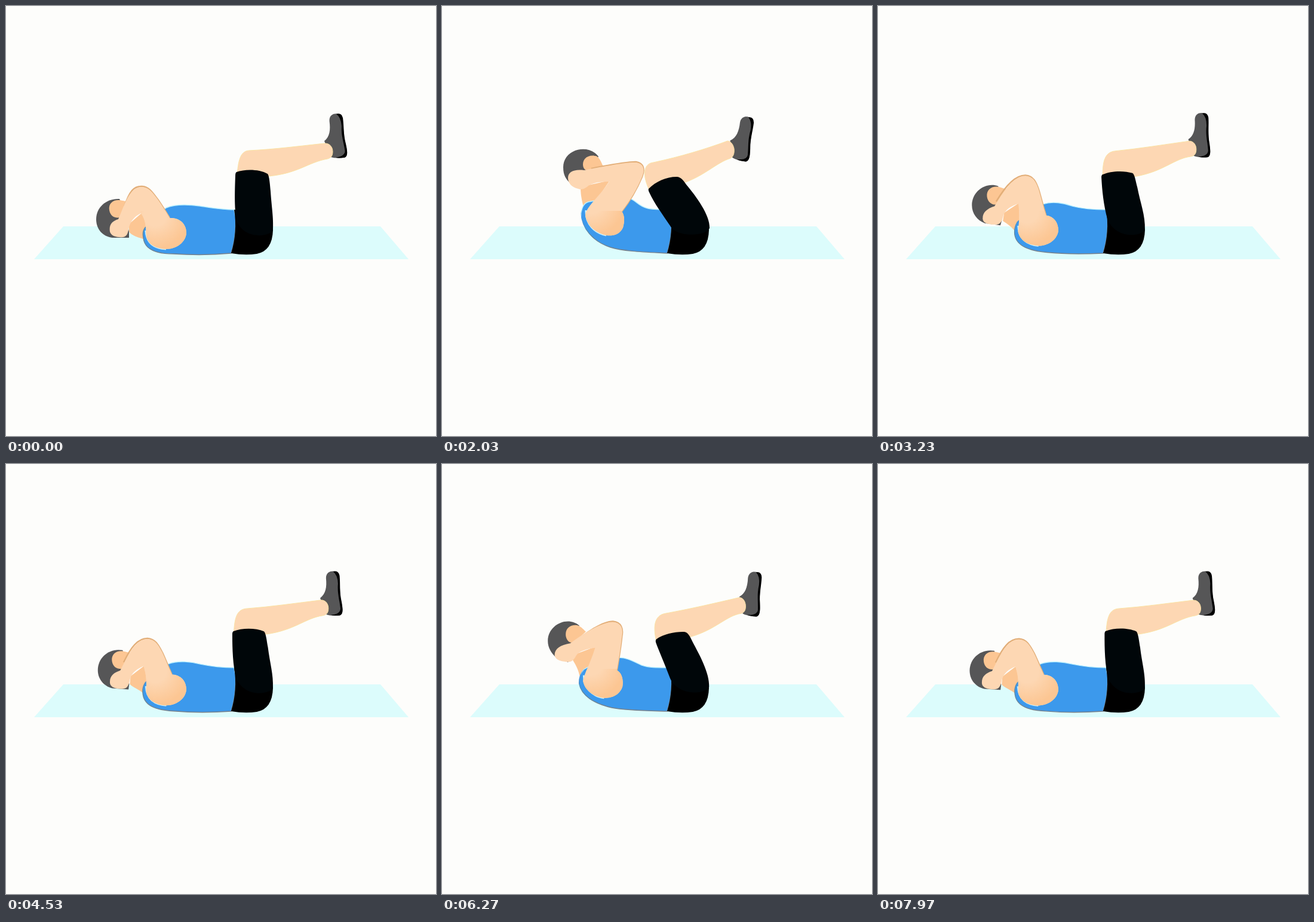
Recreate the animation shown at these times as an HTML page. Size 720x720 px, loop 8 s.

```html
<!DOCTYPE html>
<html lang="en">
<head>
<meta charset="utf-8">
<title>Crunch exercise</title>
<style>
html, body { margin: 0; width: 100%; height: 100%; overflow: hidden; background: #fdfdfb; }
svg { display: block; width: 100vw; height: 100vh; }
</style>
</head>
<body>
<svg viewBox="0 0 720 720">
  <defs>
    <linearGradient id="rim" gradientUnits="userSpaceOnUse" x1="0" y1="335" x2="0" y2="410">
      <stop offset="0.1" stop-color="#bdf1ff"/>
      <stop offset="0.25" stop-color="#3c99ec"/>
      <stop offset="0.6" stop-color="#5f87a0"/>
      <stop offset="1" stop-color="#76808a"/>
    </linearGradient>
    <radialGradient id="armSkin" gradientUnits="userSpaceOnUse" cx="250" cy="345" r="62">
      <stop offset="0.3" stop-color="#fdd7b3"/>
      <stop offset="0.9" stop-color="#fcc693"/>
    </radialGradient>
    <clipPath id="shoulder"><rect x="225" y="343" width="90" height="75"/></clipPath>
  </defs>
  <path fill="#dcfcfc" d="M96 369H627L674 424H47Z"/>
  <g id="shoe">
    <path fill="#565657" d="M8 -47C9 -58 18 -59 24 -57Q30 -55 30 -44C30 -30 28 -20 30 0Q32 15 25 17Q10 17 2 13L-5 -15C5 -21 8 -32 8 -47Z"/>
    <path fill="#000" d="M21 -57Q30 -59 31 -49C31 -35 28 -22 30 -6C31 6 31 16 25 17Q14 17 10 15Q26 15 27 6C27 -8 24 -20 27 -36Q28 -51 21 -57Z"/>
  </g>
  <g id="body"></g>
</svg>
<script>
const CYCLE = 3450, LOOP = 8000;
const MID = 0.458; // progress of the middle pose
const SKIN = "#fdd7b3", SHADE = "#fcc693", DARK = "#565657";
const HIP = "M382 341Q388 378 377 414Q400 418 420 415Q446 410 447 375Q445 360 436 352Z";

// Each part: attributes, then its outline lying down, half way and curled up.
const parts = [
  [{ fill: SKIN, stroke: "#fbe3a4" },
    "M387 282C389 262 391 243 407 242C450 240 495 234 534 230C543 230 547 237 547 244C547 252 543 255 538 256C505 262 490 280 440 285L400 290Z",
    "M366 292C364 272 363 249 385 246C425 240 465 232 508 224C515 224 519 231 519 238C519 246 516 249 511 250C485 253 468 276 423 287L385 295Z",
    "M347 308C336 285 336 264 354 262C400 252 440 240 478 226C484 226 488 233 489 239C490 248 487 253 483 255C460 262 440 284 405 296L370 305Z"],
  [{ fill: SHADE },
    "M206 365L228 346L238 375L233 391C222 388 210 384 206 378Z",
    "M217 330L248 315L243 362L230 368C226 352 218 346 214 342Z",
    "M232 303L281 292L262 320L240 348C235 330 232 318 232 303Z"],
  [{ fill: "#3c99ec", stroke: "url(#rim)", "stroke-width": 1.4 },
    "M268 338C285 331 310 333 325 335C345 338 362 341 382 341Q388 378 377 414C345 417 310 417 280 415C255 415 232 410 230 388C229 383 229 376 233 371C245 360 258 345 268 338Z",
    "M287 327C300 324 315 329 330 336C345 341 362 341 382 341Q388 378 377 414C345 414 310 414 284 410C255 405 233 395 229 376C228 366 230 360 235 352C250 340 275 330 287 327Z",
    "M316 323C325 326 330 336 345 339C355 341 362 341 382 341Q388 378 377 414C340 412 305 411 282 404C252 394 234 372 233 347C234 338 238 330 245 328C265 324 300 320 316 323Z"],
  [{ fill: "#000" }, HIP, HIP, HIP],
  [{ fill: "#000609" },
    "M386 278C400 273 424 273 438 281C441 284 442 300 443 310C445 340 448 352 447 376C440 386 402 392 387 362C382 345 383 310 384 284Q384 279 386 278Z",
    "M366 288C380 280 400 278 415 280C420 282 422 290 426 300C434 322 448 350 447 374C440 386 398 390 383 358C374 330 368 308 365 294Q364 290 366 288Z",
    "M346 306C358 294 375 286 393 286C400 286 405 293 409 299C425 318 449 350 448 372C442 386 392 388 382 368C370 350 355 330 347 312Q345 308 346 306Z"],
  [{ fill: DARK },
    "M190 323C168 322 151 337 151 357C151 374 162 386 178 388L206 388L206 378C200 350 195 335 190 323Z",
    "M216 283C195 270 167 287 167 312C167 324 174 334 184 341L207 347L212 340C212 320 214 300 216 283Z",
    "M262 252C246 230 203 239 203 270C203 284 208 290 214 296L224 304L236 300C240 280 255 265 262 252Z"],
  [{ fill: SHADE },
    "M173 342C171 330 180 324 190 325C198 326 204 328 208 328L200 350C192 356 176 358 173 342Z",
    "M195 298C195 288 203 282 213 283C219 284 224 288 229 291L212 312C203 316 195 308 195 298Z",
    "M236 265C236 255 245 249 257 251C263 252 266 260 270 269L245 276C238 275 236 270 236 265Z"],
  [{ fill: "none", stroke: "#c4f0ff", "stroke-width": 3 },
    "M234 376C235 398 248 406 268 407",
    "M236 360C236 380 250 394 270 396",
    "M241 342C240 366 256 380 275 384"],
  [{ fill: "none", stroke: "#e2ae78", "stroke-width": 2.5 },
    "M198 336C207 310 214 301 228 302C240 303 245 312 255 325C262 335 268 345 274 355",
    "M205 315C222 296 248 270 268 270C282 271 286 282 286 295C287 312 287 330 288 347",
    "M250 272C268 269 310 260 325 261C338 263 340 274 335 286C327 305 316 325 301 344"],
  [{ fill: SKIN },
    "M174 378C172 366 178 360 188 357C198 335 206 302 228 303C240 304 245 312 255 325C262 335 268 345 274 355C290 354 302 364 302 380C301 396 285 407 268 407C248 406 238 398 235 386C234 372 235 360 226 347C216 352 210 358 206 370C204 382 202 386 196 387C188 388 176 386 174 378Z",
    "M181 336C181 325 190 319 205 315C222 296 248 271 268 271C282 272 286 282 286 295C287 312 287 330 288 347C299 351 303 362 302 374C298 390 283 396 270 396C250 394 238 384 235 370C238 355 243 340 246 317C233 320 221 324 217 333C214 342 210 346 204 346C195 346 182 345 181 336Z",
    "M211 288C211 278 220 273 238 275C268 269 310 261 325 262C338 264 340 274 335 286C327 305 316 325 301 344C306 351 306 360 303 371C297 384 285 385 275 384C256 380 242 366 240 350C242 335 265 318 280 294C265 294 252 296 245 301C238 307 233 308 228 306C218 304 211 297 211 288Z"]
];

const body = document.getElementById("body");
const shoe = document.getElementById("shoe");
const addPath = (attrs) => {
  const el = document.createElementNS("http://www.w3.org/2000/svg", "path");
  for (const k in attrs) el.setAttribute(k, attrs[k]);
  return body.appendChild(el);
};
const numbers = (d) => d.match(/[\d.]+/g).map(Number);
const shapes = parts.map(([attrs, ...poses]) => ({
  el: addPath(attrs), ops: poses[0], poses: poses.map(numbers)
}));
const arm = shapes[shapes.length - 1].el;
const shade = addPath({ fill: "url(#armSkin)", "clip-path": "url(#shoulder)" });
const shading = document.getElementById("armSkin");

// Quadratic through the three poses.
const blend = (p) => {
  const w = [(p - MID) * (p - 1) / MID, p * (p - 1) / (MID * (MID - 1)), p * (p - MID) / (1 - MID)];
  return (a, b, c) => a * w[0] + b * w[1] + c * w[2];
};

const clamp = (x) => Math.min(1, Math.max(0, x));
const ease = (u, k) => u + k * u * (1 - u);

function progress(t) {
  const ph = t % CYCLE;
  return ease(clamp((ph - 970) / 1060), 0.1) - ease(clamp((ph - 2480) / 980), 0.04);
}

function draw(t) {
  const mix = blend(progress(t));
  for (const { el, ops, poses: [a, b, c] } of shapes) {
    let i = 0;
    el.setAttribute("d", ops.replace(/[\d.]+/g, () => {
      const v = mix(a[i], b[i], c[i]);
      i++;
      return v.toFixed(2);
    }));
  }
  shade.setAttribute("d", arm.getAttribute("d"));
  shading.setAttribute("cy", mix(350, 339, 329));
  shoe.setAttribute("transform",
    `translate(${mix(540, 512, 485.7)} ${mix(240.3, 237, 240.7)}) rotate(${mix(-7.8, 0, 6.5)})`);
}

const start = performance.now();
function tick() {
  draw((performance.now() - start) % LOOP);
  requestAnimationFrame(tick);
}
tick();
</script>
</body>
</html>
```
